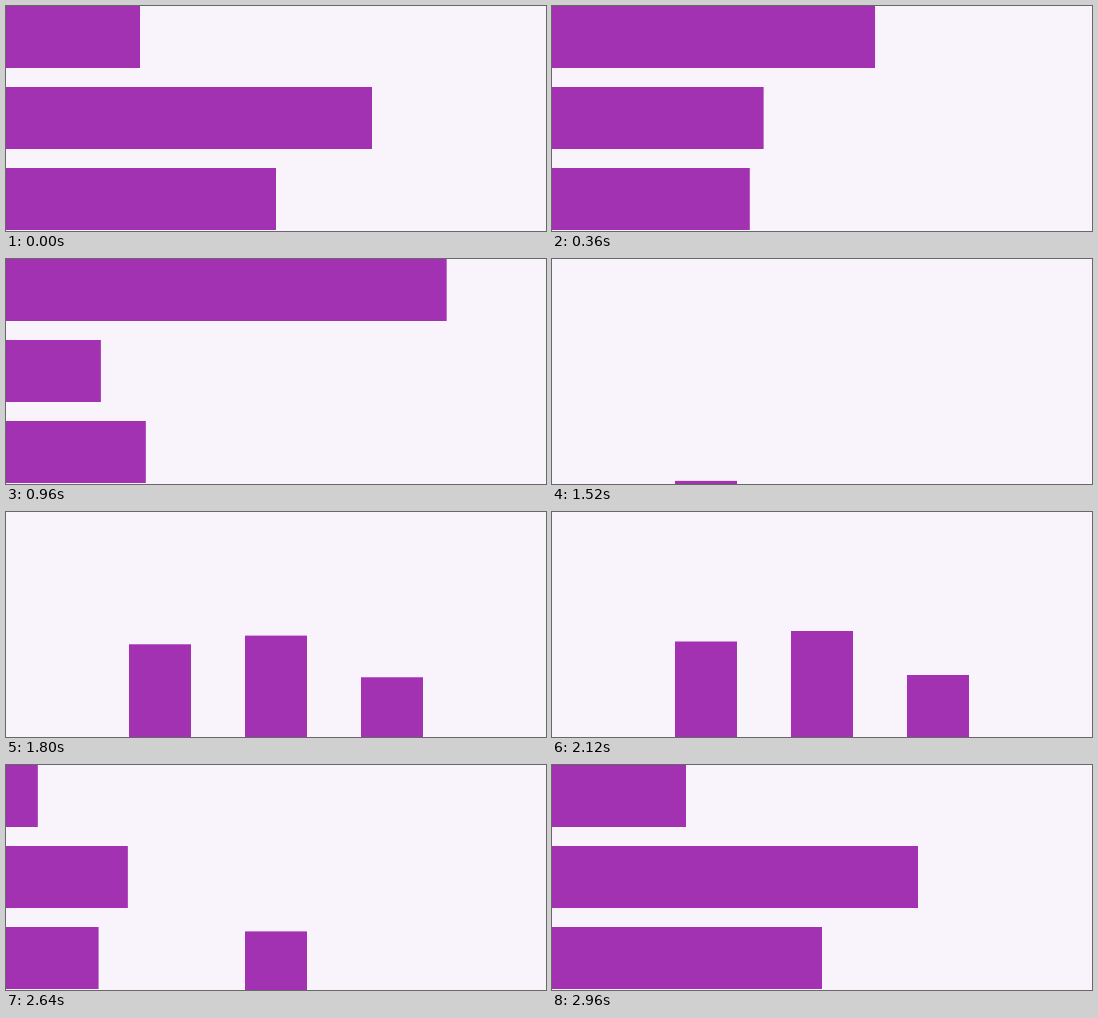
These frames come from a looping animation (540x225 px, 3 s). An HTML page with a canvas:

```html
<!DOCTYPE html>
<html>
<head>
<meta charset="utf-8">
<style>
html, body { margin: 0; width: 100%; height: 100%; overflow: hidden; background: #f9f3fb; }
canvas { display: block; }
</style>
</head>
<body>
<canvas id="stage" width="540" height="225"></canvas>
<script>
const LOOP = 3000, THICK = 62;
const ctx = document.getElementById('stage').getContext('2d');

const inQuint = p => p ** 5;
const outQuint = p => 1 - (1 - p) ** 5;
const inOut = p => p < 0.5 ? 4 * p ** 3 : 1 - 4 * (1 - p) ** 3;

// Rows span the loop seam, so their times run past LOOP.
const rows = [
  { y: 0, size: [134, 456], enter: 2622, exit: [3720, 4195] },
  { y: 81, size: [366, 103], enter: 2613, exit: [3680, 4147] },
  { y: 162, size: [270, 147], enter: 2612, exit: [3680, 4194] }
];
const columns = [
  { x: 123, size: 95.5, enter: 1517.3, exit: [2120, 2630] },
  { x: 239, size: 106, enter: 1540, exit: [2120, 2732] },
  { x: 355, size: 62, enter: 1530, exit: [2120, 2630] }
];

function progress(t, from, to) {
  return Math.min(1, Math.max(0, (t - from) / (to - from)));
}

function visible(t, bar, enterTime) {
  return outQuint(progress(t, bar.enter, bar.enter + enterTime)) *
    (1 - inQuint(progress(t, ...bar.exit)));
}

function draw(now) {
  const t = now % LOOP;
  const rowTime = t < 1400 ? t + LOOP : t;
  const shift = inOut(progress(rowTime, 3000, 3680));

  ctx.fillStyle = '#f9f3fb';
  ctx.fillRect(0, 0, 540, 225);
  ctx.fillStyle = '#a232b2';
  for (const row of rows) {
    const [start, end] = row.size;
    const width = (start + (end - start) * shift) * visible(rowTime, row, 360);
    ctx.fillRect(0, row.y, width, THICK);
  }
  for (const col of columns) {
    const height = col.size * visible(t, col, 560);
    ctx.fillRect(col.x, 225 - height, THICK, height);
  }
}

function tick() {
  draw(performance.now());
  requestAnimationFrame(tick);
}
tick();
</script>
</body>
</html>
```
